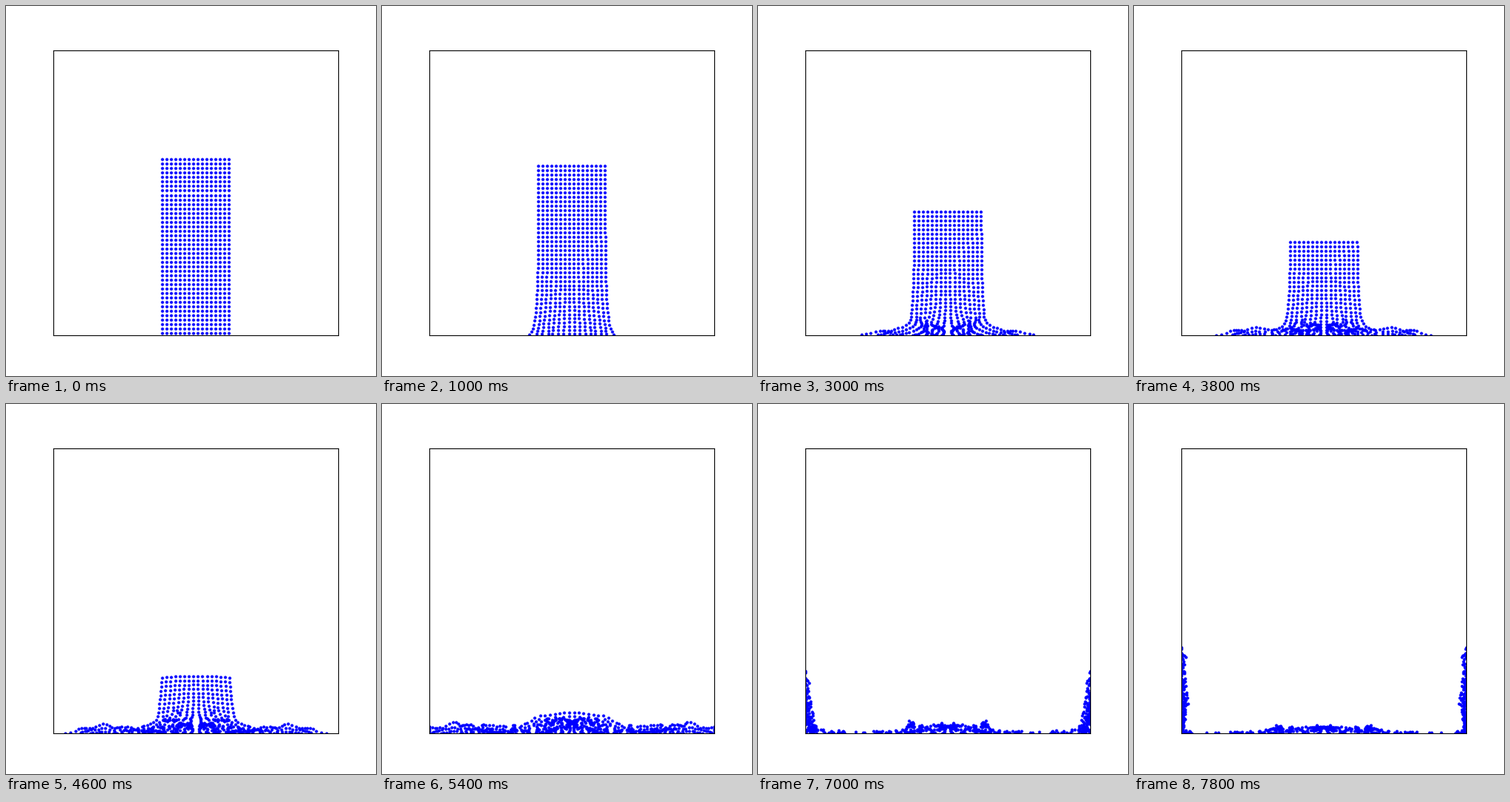
Recreate the animation shown at these times as a matplotlib script. Size 500x500 px, loop 8000 ms.

```python
import numpy as np
import matplotlib.pyplot as plt
from matplotlib.animation import FuncAnimation

# Collapse of a water column: particle-in-cell flow on a staggered grid.
# Lengths are in cells, time in steps. The flow is symmetric, so only the
# right half is solved and then mirrored about the centre line.
W, H = 32, 64
STEPS = 40
GRAVITY = 9.8 * 0.1 ** 2
EDGE = 0.01


def stencil(gx, gy, shape):
    """Flat indices and bilinear weights of the four nodes round each point."""
    gx = np.clip(gx, 0, shape[0] - 1)
    gy = np.clip(gy, 0, shape[1] - 1)
    i = np.minimum(gx.astype(int), shape[0] - 2)
    j = np.minimum(gy.astype(int), shape[1] - 2)
    fx, fy = gx - i, gy - j
    base = i * shape[1] + j
    idx = np.array([base, base + shape[1], base + 1, base + shape[1] + 1])
    wts = np.array([(1 - fx) * (1 - fy), fx * (1 - fy), (1 - fx) * fy, fx * fy])
    return idx, wts


def to_grid(vel, idx, wts, shape):
    size = shape[0] * shape[1]
    mass = np.bincount(idx.ravel(), wts.ravel(), size)
    flow = np.bincount(idx.ravel(), (wts * vel).ravel(), size)
    return np.where(mass > 1e-12, flow / np.maximum(mass, 1e-12), 0).reshape(shape)


def to_points(field, idx, wts):
    return (field.ravel()[idx] * wts).sum(axis=0)


def pressure(wet, div):
    """Solve for the pressure in wet cells; it is zero in the air."""
    i, j = np.nonzero(wet)
    k = np.arange(len(i))
    ids = np.full(wet.shape, -1)
    ids[wet] = k
    mat = np.eye(len(i)) * 1e-9
    for di, dj in ((1, 0), (-1, 0), (0, 1), (0, -1)):
        a, b = i + di, j + dj
        inside = (a >= 0) & (a < W) & (b >= 0) & (b < H)
        mat[k, k] += inside
        near = ids[a % W, b % H]
        link = inside & (near >= 0)
        mat[k[link], near[link]] -= 1
    p = np.zeros(wet.shape)
    p[wet] = np.linalg.solve(mat, -div[wet])
    return p


def step(x, y, vx, vy):
    u_shape, v_shape = (W + 1, H), (W, H + 1)
    at_u = stencil(x, y - 0.5, u_shape)
    at_v = stencil(x - 0.5, y, v_shape)
    u = to_grid(vx, *at_u, u_shape)
    v = to_grid(vy, *at_v, v_shape) - GRAVITY
    u[[0, -1]] = 0
    v[:, [0, -1]] = 0

    wet = np.zeros((W, H), bool)
    wet[x.astype(int), y.astype(int)] = True
    p = pressure(wet, np.diff(u, axis=0) + np.diff(v, axis=1))
    u[1:-1] -= np.diff(p, axis=0)
    v[:, 1:-1] -= np.diff(p, axis=1)

    vx, vy = to_points(u, *at_u), to_points(v, *at_v)
    x = np.clip(x + vx, EDGE, W - EDGE)
    y = np.clip(y + vy, EDGE, H - EDGE)
    return x, y, vx, vy


def simulate():
    x, y = (a.ravel() + 0.5 for a in np.meshgrid(np.arange(8), np.arange(40)))
    state = x, y, np.zeros_like(x), np.zeros_like(y)
    path = []
    for _ in range(STEPS):
        x, y = state[:2]
        path.append((np.r_[W - x, W + x], np.r_[y, y]))
        state = step(*state)
    return path


path = simulate()

fig, ax = plt.subplots(figsize=(5, 5), dpi=100)
ax.set(xlim=(0, 2 * W), ylim=(0, H), xticks=[], yticks=[], aspect="equal")
dots, = ax.plot(*path[0], "bo", ms=2)


def draw(n):
    dots.set_data(*path[n])
    return dots,


anim = FuncAnimation(fig, draw, frames=STEPS, interval=200, repeat=True,
                     repeat_delay=0)
plt.show()
```
